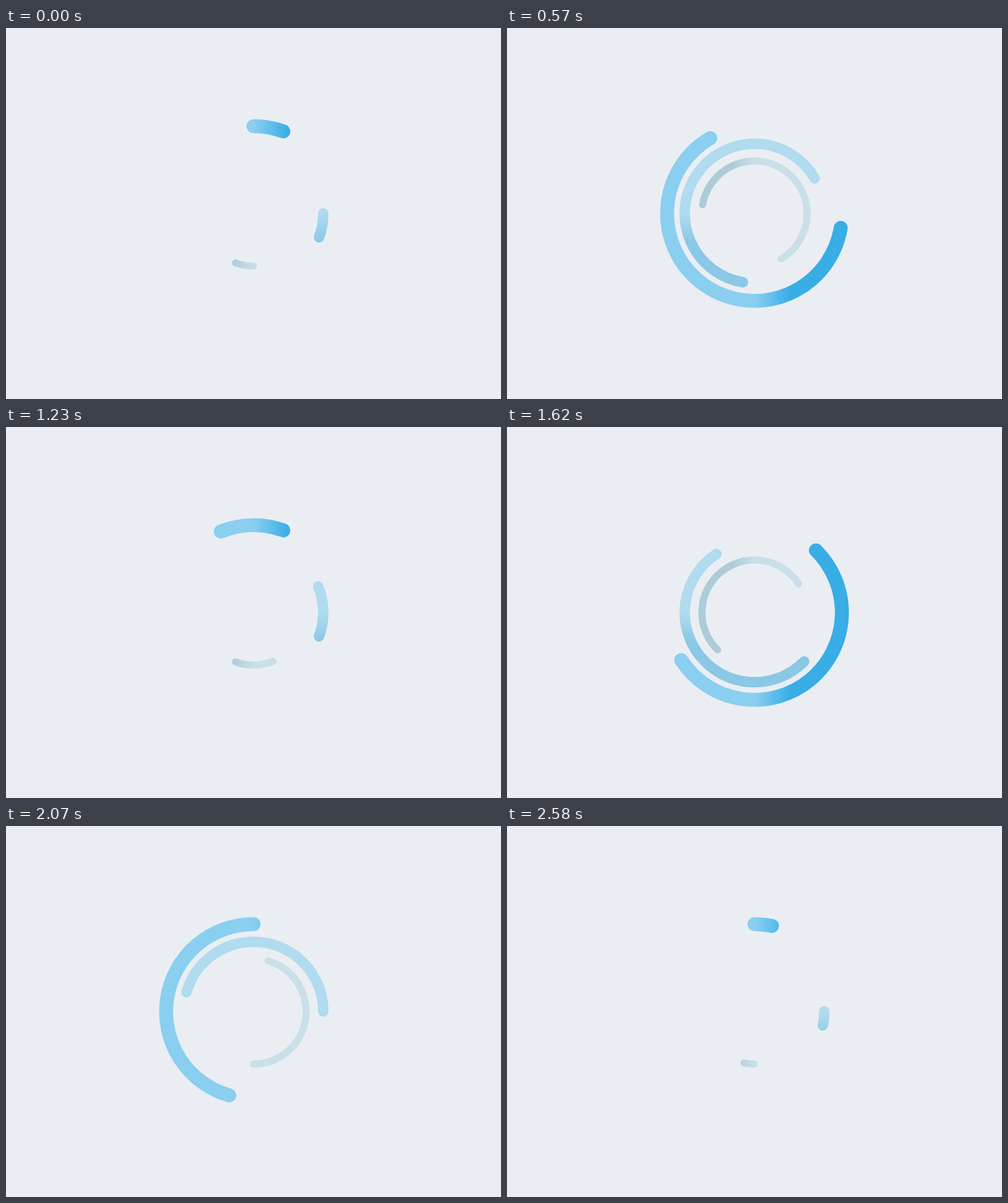
An HTML page that plays this animation: 800x600 px, repeating every 2610 ms.

```html
<!DOCTYPE html>
<html lang="en">
<head>
<meta charset="utf-8">
<title>Loading rings</title>
<style>
  html, body { margin: 0; width: 100%; height: 100%; overflow: hidden; background: #eaeef3; }
  svg { display: block; width: 100vw; height: 100vh; }
  path { fill: none; stroke-linecap: round; }
</style>
</head>
<body>
<svg viewBox="0 0 800 600">
  <defs>
    <linearGradient id="g0" gradientUnits="userSpaceOnUse" x1="0" x2="58" y1="0" y2="0">
      <stop offset="0" stop-color="#8acff0"/><stop offset="1" stop-color="#38ade6"/>
    </linearGradient>
    <linearGradient id="g1" gradientUnits="userSpaceOnUse" x1="0" x2="46" y1="0" y2="0">
      <stop offset="0" stop-color="#b1dbef"/><stop offset="1" stop-color="#8bc8e6"/>
    </linearGradient>
    <linearGradient id="g2" gradientUnits="userSpaceOnUse" x1="0" x2="35" y1="0" y2="0">
      <stop offset="0" stop-color="#cadfe8"/><stop offset="1" stop-color="#adccd9"/>
    </linearGradient>
  </defs>
  <g transform="translate(400 300)">
    <path stroke="url(#g0)" stroke-width="22.6"/>
    <path stroke="url(#g1)" stroke-width="17" transform="rotate(90)"/>
    <path stroke="url(#g2)" stroke-width="11.5" transform="rotate(180)"/>
  </g>
</svg>
<script>
const STEP = 30;               // ms per picture
const STEPS = 87;              // pictures per loop
const STARTS = [0, 41, 87];    // when each sweep passes its reference point
const RADII = [141.25, 112.75, 85];
const paths = document.querySelectorAll('path');

const clamp = v => Math.min(1, Math.max(0, v));
const smooth = s => s * s * (3 - 2 * s);

// Ease with control points (x1, 0) and (x2, 1)
function ease(x, x1, x2) {
  let lo = 0, hi = 1;
  for (let i = 0; i < 30; i++) {
    const s = (lo + hi) / 2, q = 1 - s;
    if (3 * x1 * s * q * q + 3 * x2 * s * s * q + s * s * s < x) lo = s;
    else hi = s;
  }
  return smooth(lo);
}

const head = p => 360 * smooth(clamp((p + 4) / 28));
const tail = p => p <= 4.2 ? 0 : p >= 44.4 ? 360 : 360 * ease((p - 4.2) / 40.2, 0.27, 0.88);

function point(r, deg) {
  const a = deg * Math.PI / 180;
  return (r * Math.sin(a)).toFixed(3) + ' ' + (-r * Math.cos(a)).toFixed(3);
}

function arc(r, from, to) {
  const large = to - from > 180 ? 1 : 0;
  return `M${point(r, from)}A${r} ${r} 0 ${large} 1 ${point(r, to)}`;
}

function draw(ms) {
  const n = Math.floor(ms / STEP + 0.001) % STEPS;
  const sweeps = STARTS
    .map(s => [tail(n - s), head(n - s)])
    .filter(([from, to]) => to - from > 0.01);
  paths.forEach((path, i) => {
    path.setAttribute('d', sweeps.map(([from, to]) => arc(RADII[i], from, to)).join(''));
  });
}

let t0;
function tick(now) {
  if (t0 === undefined) t0 = now;
  draw(now - t0);
  requestAnimationFrame(tick);
}
draw(0);
requestAnimationFrame(tick);
</script>
</body>
</html>
```
